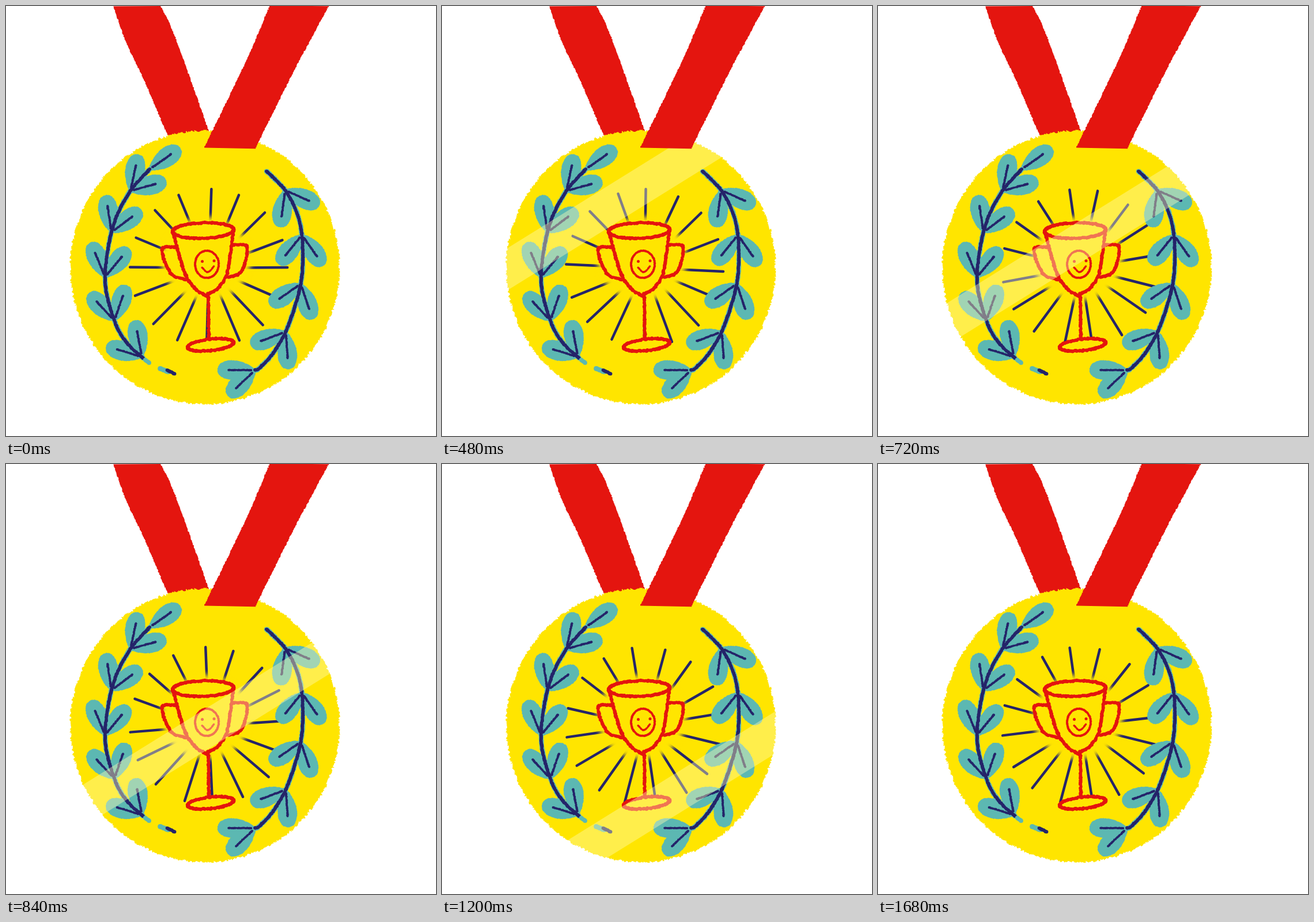
An HTML page with a canvas that plays this animation: 746x745 px, repeating every 1.71 s.

```html
<!DOCTYPE html>
<html lang="en">
<head>
<meta charset="utf-8">
<title>Medal</title>
<style>
  html, body { margin: 0; width: 100%; height: 100%; overflow: hidden; background: #fff; }
  canvas { display: block; }
</style>
</head>
<body>
<canvas id="stage" width="746" height="745"></canvas>
<script>
const W = 746, H = 745, LOOP = 1710, STEP = 30, DEG = Math.PI / 180;
const RED = '#e4150f', YELLOW = '#ffe500', TEAL = '#5cb8b2', NAVY = '#25246a';
const GRAIN = 1.5; // distance between samples on a curve
const ctx = document.getElementById('stage').getContext('2d');

let seed = 7;
function jitter(amount) {
  seed = (seed * 16807) % 2147483647;
  return (seed / 2147483647 * 2 - 1) * amount;
}

function layer(draw) {
  const c = document.createElement('canvas');
  c.width = W;
  c.height = H;
  draw(c.getContext('2d'));
  return c;
}

// Evenly sampled Catmull-Rom curve through [x, y] points
function curve(p, closed) {
  const n = p.length, out = [];
  const at = i => closed ? p[(i + n) % n] : p[Math.max(0, Math.min(n - 1, i))];
  for (let i = 0; i < (closed ? n : n - 1); i++) {
    const a = at(i - 1), b = at(i), c = at(i + 1), d = at(i + 2);
    const steps = Math.max(2, Math.round(Math.hypot(c[0] - b[0], c[1] - b[1]) / GRAIN));
    for (let s = 0; s < steps; s++) {
      const t = s / steps;
      out.push([0, 1].map(k => 0.5 * (2 * b[k] + (c[k] - a[k]) * t +
        (2 * a[k] - 5 * b[k] + 4 * c[k] - d[k]) * t * t +
        (3 * b[k] - a[k] - 3 * c[k] + d[k]) * t * t * t)));
    }
  }
  if (!closed) out.push(p[n - 1]);
  return out;
}

function ellipse(cx, cy, rx, ry, slope = 0) {
  const n = Math.round(2 * Math.PI * Math.max(rx, ry) / GRAIN);
  return Array.from({ length: n }, (_, i) => {
    const a = i / n * 2 * Math.PI, x = rx * Math.cos(a);
    return [cx + x, cy + ry * Math.sin(a) + x * slope];
  });
}

function shape(points, rough) {
  const path = new Path2D();
  for (const [x, y] of points) path.lineTo(x + jitter(rough), y + jitter(rough));
  path.closePath();
  return path;
}

function paint(g, path, color) {
  g.fillStyle = color;
  g.fill(path);
}

// Crayon line made of overlapping dots
function crayon(g, points, width, color, rough) {
  g.fillStyle = color;
  for (const [x, y] of points) {
    g.beginPath();
    g.arc(x + jitter(rough), y + jitter(rough), width / 2 + jitter(rough / 2), 0, 7);
    g.fill();
  }
}

// A place on a leaf: u along its axis, v across
function onLeaf(l, u, v) {
  const s = Math.sin(l.angle), c = Math.cos(l.angle);
  return [l.x + l.size * (u * s + v * c), l.y + l.size * (v * s - u * c)];
}

const half = [[0.3, 0.2], [0.65, 0.26], [0.92, 0.17]];
const leafRim = [[0, 0], ...half, [1, 0], ...half.map(([u, v]) => [u, -v]).reverse()];

// Pairs of leaves grow at equal gaps along the stem; the tip has its own set
function sprig(g, points, first, gap, count, spread, tip) {
  const stem = curve(points), leaves = [];
  const grow = (i, angles) => {
    const [x, y] = stem[i], j = Math.min(i + 4, stem.length - 1), k = Math.max(j - 8, 0);
    const heading = Math.atan2(stem[j][0] - stem[k][0], stem[k][1] - stem[j][1]);
    for (const a of angles) leaves.push({ x, y, angle: heading + (a + 8) * DEG, size: 65 });
  };
  for (let n = 0; n < count; n++) grow(Math.round((first + n * gap) / GRAIN), [-spread, spread]);
  grow(stem.length - 1, tip);

  crayon(g, stem, 8, TEAL, 0.6);
  for (const l of leaves) paint(g, shape(curve(leafRim.map(([u, v]) => onLeaf(l, u, v)), true), 0.5), TEAL);
  for (const l of leaves) crayon(g, curve([onLeaf(l, 0.1, 0), onLeaf(l, 0.7, 0)]), 4, NAVY, 0.4);
  crayon(g, stem, 5.5, NAVY, 0.5);
}

function trophy(g) {
  const red = (pts, w = 5.5, rough = 0.8) => crayon(g, pts, w, RED, rough);
  // Half profiles, mirrored about an axis that leans slightly
  const cup = [[52, 391], [45, 428], [35, 467], [18, 491], [0, 501]];
  const handle = [[49, 416], [70, 416], [74, 425], [66, 453], [56, 466], [37, 472]];
  for (const side of [-1, 1])
    for (const part of [cup, handle])
      red(curve(part.map(([w, y]) => [342 + (y - 390) / 13 + side * w, y - side * 2])));
  red(ellipse(342, 389, 53, 13.5, -0.03));
  red(curve([[351, 501], [352, 575]]));
  const foot = ellipse(355, 587, 40, 10, -0.1);
  paint(g, shape(foot, 0), YELLOW);
  red(foot);

  red(ellipse(348.5, 447.5, 20.5, 23.5), 4, 0.35);
  red([[340.5, 442.5], [361, 441.5]], 5, 0);
  red(curve([[340, 453], [350, 461], [361, 451]]), 3.5, 0.3);
}

const medal = shape(ellipse(345, 453, 233.5, 237), 2);

const strip = (a, b) => shape([...curve(a), ...curve(b)], 0.8);
const leftStrip = strip([[186, 0], [208, 62], [241, 132], [282, 228]], [[353, 220], [294, 55], [268, 0]]);
const rightStrip = strip([[457, 0], [418, 92], [344, 245]], [[432, 248], [500, 112], [560, 0]]);

const back = layer(g => {
  paint(g, leftStrip, RED);
  paint(g, medal, YELLOW);
});

const front = layer(g => {
  // Soft halo that fades the inner ends of the rays
  g.filter = 'blur(5px)';
  paint(g, shape(ellipse(347, 438, 78, 73), 0), YELLOW);
  g.filter = 'none';

  sprig(g, [[238, 610], [210, 584], [188, 545], [172, 475], [184, 388], [212, 326], [249, 283]], 5, 78, 5, 31, [4]);
  sprig(g, [[452, 286], [487, 323], [509, 372], [515, 430], [510, 488], [488, 558], [463, 602], [440, 627], [432, 631]],
    46, 85, 4, 37, [-22, 22]);
  crayon(g, curve([[241, 613], [248, 618]]), 7, TEAL, 0.4);
  crayon(g, curve([[267, 628], [282, 634]]), 8, TEAL, 0.4);
  crayon(g, curve([[280, 631], [292, 637]]), 6, NAVY, 0.5);
  trophy(g);
});

function drawRays(turn) {
  ctx.strokeStyle = NAVY;
  ctx.lineWidth = 4.5;
  ctx.lineCap = 'round';
  ctx.beginPath();
  for (let i = 0; i < 16; i++) {
    const wobble = 0.75 + 1.2 * Math.cos(2.244 * i);
    const a = (i * 22.5 + wobble + turn) * DEG, x = Math.sin(a), y = -Math.cos(a);
    ctx.moveTo(351.7 + 45 * x, 453.7 + 45 * y);
    ctx.lineTo(351.7 + 136.5 * x, 453.7 + 136.5 * y);
  }
  ctx.stroke();
}

function drawGloss(low) {
  const y = x => low - 0.62 * (x - 350);
  ctx.save();
  ctx.clip(medal);
  ctx.fillStyle = 'rgba(255,250,180,0.42)';
  ctx.beginPath();
  ctx.moveTo(0, y(0));
  ctx.lineTo(W, y(W));
  ctx.lineTo(W, y(W) - 73);
  ctx.lineTo(0, y(0) - 73);
  ctx.fill();
  ctx.restore();
}

const start = performance.now();
function frame(now) {
  const step = Math.floor(Math.max(0, now - start) % LOOP / STEP);
  ctx.fillStyle = '#fff';
  ctx.fillRect(0, 0, W, H);
  ctx.drawImage(back, 0, 0);
  drawRays(step * 1.455);
  ctx.drawImage(front, 0, 0);
  drawGloss(148 + step * 12.375);
  paint(ctx, rightStrip, RED);
  requestAnimationFrame(frame);
}
frame(start);
</script>
</body>
</html>
```
